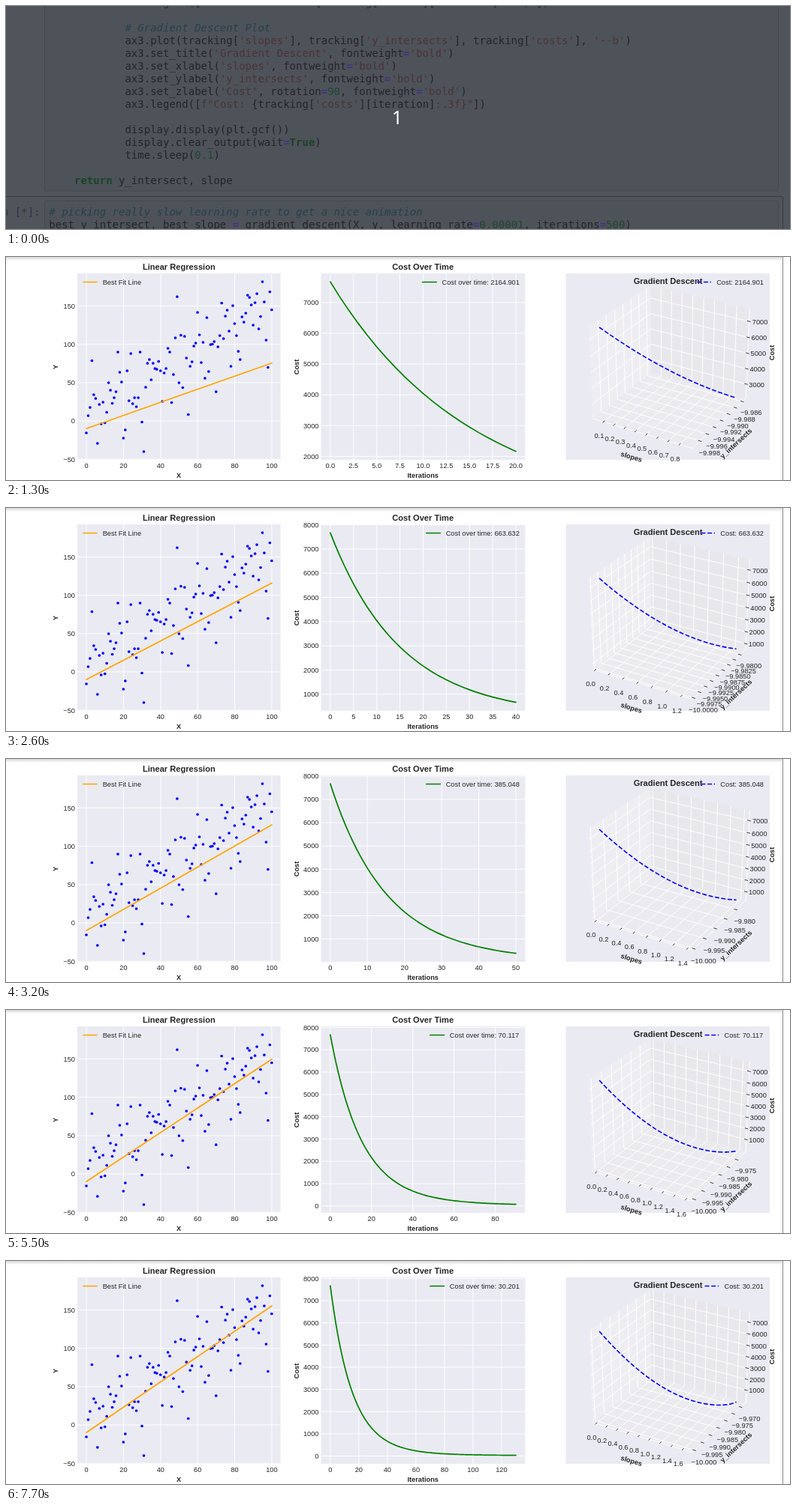
Write an HTML page that moves like this. It is 1044 by 298 pixels and loops after 8 s.

```html
<!DOCTYPE html>
<html lang="en">
<head>
<meta charset="utf-8">
<title>Linear regression by gradient descent</title>
<style>
  html, body { margin: 0; width: 100%; height: 100%; overflow: hidden; background: #fff; }
  svg { display: block; width: 1044px; height: 298px; }
  text { font: 9.26px "Liberation Sans", Arial, sans-serif; fill: #262626; white-space: pre; }
  .b { font-weight: bold; }
  .title { font-size: 11.1px; font-weight: bold; }
  .mid { text-anchor: middle; }
  .end { text-anchor: end; }
  .grid { stroke: #fff; stroke-width: .93; fill: none; }
  .tick { stroke: #262626; stroke-width: .9; }
  .fit, .cost, .path { fill: none; stroke-width: 1.7; stroke-linejoin: round; }
  .fit { stroke: #ffa500; stroke-linecap: round; }
  .cost { stroke: #008000; stroke-linecap: round; }
  .path { stroke: #00f; stroke-width: 1.62; stroke-dasharray: 6 2.6; }
  #code text { font: 14px "DejaVu Sans Mono", monospace; fill: #23262a; }
  #code .c { fill: #25434c; font-style: italic; }
  #code .s { fill: #4b3438; }
  #code .k { fill: #1b4428; font-weight: bold; }
  #code .n { fill: #1f4730; }
  #code .o { fill: #443384; font-weight: bold; }
  #code .prompt { fill: #2c3549; }
  #code .count { font: 25px "Noto Sans", "Open Sans", sans-serif; fill: #fff; }
</style>
</head>
<body>
<svg viewBox="0 0 1044 298">
  <defs>
    <linearGradient id="shade" x1="0" y1="0" x2="0" y2="1">
      <stop offset="0" stop-color="#d8d8d8"/><stop offset="1" stop-color="#fff"/>
    </linearGradient>
    <clipPath id="edge"><rect width="1023" height="298"/></clipPath>
  </defs>
  <g id="code"></g>
  <g id="plots">
    <rect width="1044" height="298" fill="#fff"/>
    <rect width="1034" height="5" fill="url(#shade)"/>
    <path d="M1034.5 0V298" stroke="#8a8a8a"/>
    <g id="fixed"></g>
    <g id="live"></g>
  </g>
</svg>
<script>
const $ = id => document.getElementById(id);
const LOOP = 8000, FONT = 9.26;
const TIMES = [200, 800, 1300, 1900, 2600, 3200, 3700, 4300, 4900, 5500, 6000, 6600, 7200, 7700];
const COSTS = [7671.596, 4044.092, 2164.901, 1182.828, 663.632, 385.048, 232.776,
  147.676, 98.884, 70.117, 52.660, 41.762, 34.779, 30.201];

// vertical pixel of the sample at x = 0, 1, ... 100
const DOTS = [235, 212, 201, 138.5, 184, 189, 249, 197, 223, 194, 221.5, 207.5, 168, 178, 195.5,
  188, 180, 127, 154, 167, 242, 231, 152, 192, 129, 196, 188, 200, 188, 127, 220.5, 260, 174, 142,
  137, 164, 142, 149, 150, 139.5, 152, 193, 155, 149, 122, 127, 194.5, 157, 108, 53, 168, 104.5,
  174.5, 106, 135, 210.5, 146, 140, 119, 115, 74, 104, 141, 114, 162, 81, 153, 117, 116.5, 113, 180,
  120, 105, 61.5, 109, 79, 71, 99, 146, 65, 89, 105, 126, 137, 80, 87, 75, 51, 54, 64, 91, 61, 49,
  96, 79.5, 33, 60, 111, 147.5, 46.5, 70.5];

// Descent model: the mean error decays geometrically towards a residue
const RATE = .966492, GAP = 83.081, REST = 4.5066;
const cost = n => (REST + GAP * RATE ** n) ** 2;
const slope = n => .0557 + GAP * (1 - RATE ** n) / 51.4;
const icept = n => -9.999095 + 1e-5 * (REST * n + GAP * (1 - RATE ** n) / (1 - RATE));

// Markup helpers
const f = v => v.toFixed(2);
const text = (x, y, s, cls = '', turn = 0) =>
  `<text class="${cls}" ${turn ? `transform="translate(${f(x)} ${f(y)}) rotate(${turn})"`
    : `x="${f(x)}" y="${f(y)}"`}>${s}</text>`;
const line = (pts, cls) => `<polyline class="${cls}" points="${pts.map(p => p.map(f).join()).join(' ')}"/>`;
const label = v => v.replace('-', '\u2212');

// Axis limits and ticks
function limits(a, b, margin) {
  if (a === b) { const d = Math.abs(a) * .05; a -= d; b += d; }
  const d = (b - a) * margin;
  return [a - d, b + d];
}
function ticks([lo, hi]) {
  const raw = (hi - lo) / 9, base = 10 ** Math.floor(Math.log10(raw));
  const step = +([1, 2, 2.5, 5, 10].find(m => m * base >= raw) * base).toPrecision(3);
  const places = (String(step).split('.')[1] || '').length, out = [];
  for (let k = Math.ceil(lo / step); k * step <= hi; k++)
    out.push({ v: k * step, s: label((k * step).toFixed(places)) });
  return out;
}
const scale = ([lo, hi], a, b) => v => a + (v - lo) / (hi - lo) * (b - a);

const TOP = 21.8, BOTTOM = 271;
const box = (x0, x1) => `<rect x="${x0}" y="${TOP}" width="${x1 - x0}" height="${BOTTOM - TOP}" fill="#eaeaf2"/>`;

function flatAxes(x0, x1, xl, yl) {
  const X = scale(xl, x0, x1), Y = scale(yl, BOTTOM, TOP);
  let s = '';
  for (const t of ticks(xl))
    s += line([[X(t.v), TOP], [X(t.v), BOTTOM]], 'grid') + text(X(t.v), 282, t.s, 'mid');
  for (const t of ticks(yl))
    s += line([[x0, Y(t.v)], [x1, Y(t.v)]], 'grid') + text(x0 - 3, Y(t.v) + 3.3, t.s, 'end');
  return { X, Y, s };
}

function legend(right, head, em, value, cls) {
  const x = right - FONT * (em + .278 + .556 * (value.length - 1));
  return line([[x - 25.9, 33.5], [x - 7.4, 33.5]], cls) + text(x, 37, head + value);
}

// Perspective of the unit cube centred on 0, seen from azimuth -60, elevation 30
function project([x, y, z]) {
  const depth = 10 - (.433 * x - .75 * y + .5 * z);
  return [884.9 + 1467 * (.866 * x + .5 * y) / depth,
    143 - 1346 * (-.25 * x + .433 * y + .866 * z) / depth];
}
const line3 = (pts, cls) => line(pts.map(project), cls);
const P = .5208, OUT = .625;
const pane = (pts, fill) => `<polygon fill="${fill}" points="${pts.map(p => project(p).map(f).join()).join(' ')}"/>`;

function cubeAxes(xl, yl, zl) {
  const X = scale(xl, -.5, .5), Y = scale(yl, -.5, .5), Z = scale(zl, -.5, .5);
  const a = P - .02, b = P + .015;
  let s = '', marks = '';
  const mark = (p, t, dx, dy) => {
    const [x, y] = project(p);
    marks += text(x + dx, y + dy + 3.3, t.s, 'mid');
  };
  for (const t of ticks(xl)) {
    const x = X(t.v);
    s += line3([[x, -P, -P], [x, P, -P], [x, P, P]], 'grid');
    marks += line3([[x, -a, -P], [x, -b, -P]], 'tick');
    mark([x, -OUT, -OUT], t, 2, 0);
  }
  for (const t of ticks(yl)) {
    const y = Y(t.v);
    s += line3([[P, y, -P], [-P, y, -P], [-P, y, P]], 'grid');
    marks += line3([[a, y, -P], [b, y, -P]], 'tick');
    mark([OUT, y, -OUT], t, -1, 0);
  }
  for (const t of ticks(zl)) {
    const z = Z(t.v);
    s += line3([[-P, -P, z], [-P, P, z], [P, P, z]], 'grid');
    marks += line3([[a, P, z], [b, P, z]], 'tick');
    mark([OUT, OUT, z], t, -6, 3);
  }
  s += line3([[-P, -P, -P], [P, -P, -P], [P, P, -P], [P, P, P]], 'grid');
  return { X, Y, Z, s: s + marks };
}

function drawFixed() {
  const left = flatAxes(95, 365.5, [-4.9, 104.7], [-50.7, 192.6]);
  const dots = DOTS.map((y, i) => `<circle cx="${f(107 + 2.468 * i)}" cy="${y}" r="1.85"/>`).join('');
  $('fixed').innerHTML =
    box(95, 365.5) + left.s + `<g fill="#00f">${dots}</g>` +
    line([[103, 33.5], [121, 33.5]], 'fit') + text(128.7, 37, 'Best Fit Line') +
    text(230.3, 16.5, 'Linear Regression', 'title mid') +
    text(230, 294.5, 'X', 'b mid') + text(69, 147, 'Y', 'b mid', -90) +
    box(419.5, 691.3) + text(555.2, 16.5, 'Cost Over Time', 'title mid') +
    text(555.2, 294.5, 'Iterations', 'b mid') + text(390.3, 147, 'Cost', 'b mid', -90) +
    box(745.5, 1017) +
    pane([[-P, -P, -P], [-P, P, -P], [-P, P, P], [-P, -P, P]], '#eeeef2') +
    pane([[-P, P, -P], [P, P, -P], [P, P, P], [-P, P, P]], '#e8e8ec') +
    pane([[-P, -P, -P], [P, -P, -P], [P, P, -P], [-P, P, -P]], '#ebebef') +
    text(881.6, 36.3, 'Gradient Descent', 'title mid') +
    text(832, 270, 'slopes', 'b mid', 16.7) +
    text(974.3, 251.3, 'y_intersects', 'b mid', -43) +
    `<g clip-path="url(#edge)">${text(1023.3, 128, 'Cost', 'b mid', -90)}</g>`;
}

function drawStep(i) {
  const n = i * 10, steps = Array.from({ length: n + 1 }, (_, k) => k);
  const value = COSTS[i].toFixed(3), span = [cost(n), cost(0)];
  const Y = v => 219 - 1.024 * v;
  const mid = flatAxes(419.5, 691.3, limits(0, n, .05), n ? limits(...span, .05) : [7251.6, 8091.6]);
  if (!n) mid.X = () => 0;
  const cube = cubeAxes(limits(slope(0), slope(n), .05), limits(icept(0), icept(n), .05), limits(...span, 0));
  const zeroAxis = n ? mid.s : flatAxes(419.5, 691.3, [-.0552, .0552], [7251.6, 8091.6]).s;
  $('live').innerHTML =
    line([[107, Y(icept(n))], [354, Y(icept(n) + 100 * slope(n))]], 'fit') +
    zeroAxis +
    (n ? line(steps.map(k => [mid.X(k), mid.Y(cost(k))]), 'cost') : '') +
    legend(684, 'Cost over time: ', 7.002, value, 'cost') +
    cube.s +
    (n ? line3(steps.map(k => [cube.X(slope(k)), cube.Y(icept(k)), cube.Z(cost(k))]), 'path') : '') +
    legend(1009, 'Cost: ', 2.612, value, 'path');
}

// Notebook source: [class|text] marks a coloured run
function drawCode() {
  const paint = s => s.replace(/«(\w)\|(.*?)»/g, '<tspan class="$1">$2</tspan>');
  const bold = "fontweight«o|=»«s|'bold'»)";
  const track = k => `tracking[«s|'${k}'»]`;
  const format = `{${track('costs')}[iteration]«s|:.3f}"»])`;
  const rows = [
    [0, 12, 'ax2.legend([«s|f"Cost over time: »' + format],
    [34, 12, '«c|# Gradient Descent Plot»'],
    [51, 12, `ax3.plot(${track('slopes')}, ${track('y_intersects')}, ${track('costs')}, «s|'--b'»)`],
    [68, 12, "ax3.set_title(«s|'Gradient Descent'», " + bold],
    [85, 12, "ax3.set_xlabel(«s|'slopes'», " + bold],
    [102, 12, "ax3.set_ylabel(«s|'y_intersects'», " + bold],
    [119, 12, "ax3.set_zlabel(«s|'Cost'», rotation«o|=»«n|90», " + bold],
    [136, 12, 'ax3.legend([«s|f"Cost: »' + format],
    [170, 12, 'display.display(plt.gcf())'],
    [187, 12, 'display.clear_output(wait«o|=»«k|True»)'],
    [204, 12, 'time.sleep(«n|0.1»)'],
    [238, 4, '«k|return» y_intersect, slope'],
    [280, 0, '«c|# picking really slow learning rate to get a nice animation»'],
    [297, 0, 'best_y_intersect, best_slope «o|=» gradient_descent(X, y, learning_rate«o|=»«n|0.00001», iterations«o|=»«n|500»)']
  ];
  $('code').innerHTML =
    '<rect width="1044" height="298" fill="#50545b"/>' +
    '<g fill="#4e5259" stroke="#454950"><rect x="51.5" y="-4.5" width="977" height="251.5" rx="2"/>' +
    '<rect x="-4.5" y="254.5" width="1039" height="60" rx="2" fill="none" stroke="#393c41"/>' +
    '<rect x="51.5" y="260.5" width="977" height="50" rx="2"/></g>' +
    text(45.5, 280, 'In [*]:', 'prompt end') +
    rows.map(([y, indent, s]) => text(57.3 + indent * 8.428, y, paint(s))).join('') +
    text(521, 158, '1', 'count mid');
}

let shown;
function frame() {
  const t = performance.now() % LOOP;
  const i = TIMES.filter(s => s <= t).length - 1;
  if (i !== shown) {
    shown = i;
    $('plots').style.display = i < 0 ? 'none' : '';
    if (i >= 0) drawStep(i);
  }
  requestAnimationFrame(frame);
}

drawCode();
drawFixed();
frame();
</script>
</body>
</html>
```
